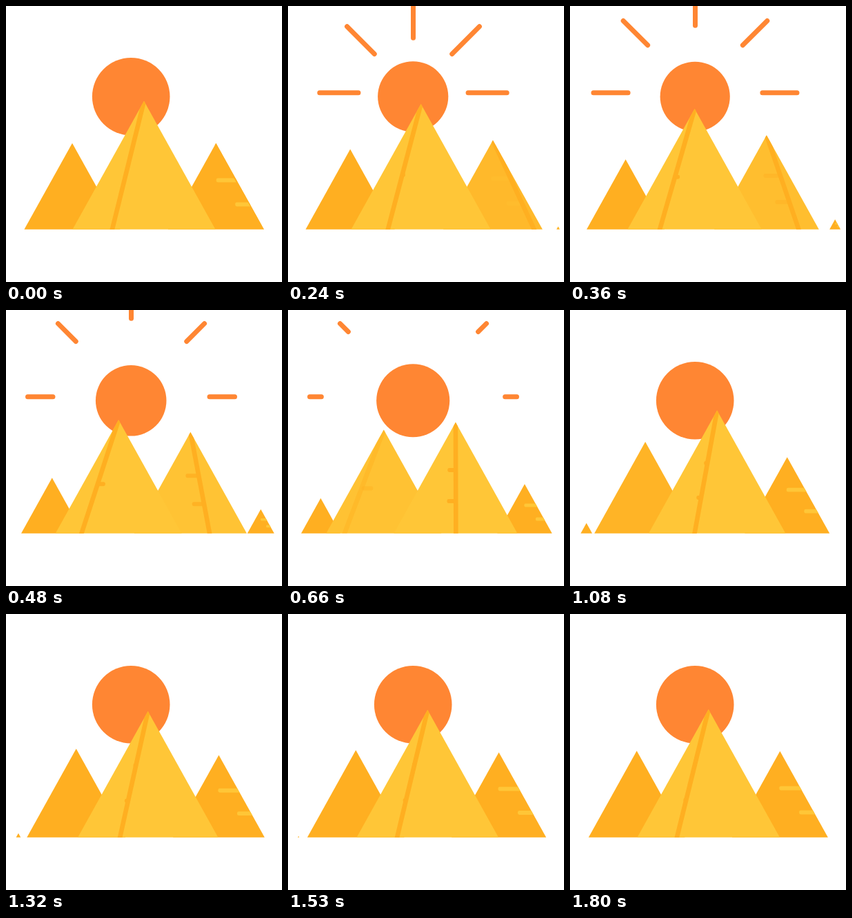
Write an HTML page with a canvas that moves like this. It is 400 by 400 pixels and loops after 1830 ms.

```html
<!DOCTYPE html>
<html lang="en">
<head>
<meta charset="utf-8">
<title>Pyramids</title>
<style>
  html, body { margin: 0; width: 100%; height: 100%; overflow: hidden; background: #fff; }
  canvas { display: block; width: 400px; height: 400px; }
</style>
</head>
<body>
<canvas id="stage" width="400" height="400"></canvas>
<script>
const LOOP = 1830, STEP = 30;
const GROUND = 323.7, SLOPE = 0.5565;
const ORANGE = [255, 175, 33], YELLOW = [255, 198, 55], SUN = '#ff8633';
const ctx = document.getElementById('stage').getContext('2d');

const clamp = v => Math.min(1, Math.max(0, v));
const lerp = (a, b, k) => a + (b - a) * k;
const span = (t, from, to) => clamp((t - from) / (to - from));
const smooth = k => k * k * (3 - 2 * k);
const rgb = c => `rgb(${c.map(Math.round)})`;
const mix = (a, b, k) => rgb(a.map((v, i) => lerp(v, b[i], k)));

// cubic-bezier(x1, 0, x2, 1), solved by bisection
function ease(u, x1, x2) {
  let lo = 0, hi = 1;
  for (let i = 0; i < 24; i++) {
    const s = (lo + hi) / 2, r = 1 - s;
    if (3 * r * r * s * x1 + 3 * r * s * s * x2 + s * s * s < u) lo = s;
    else hi = s;
  }
  return smooth((lo + hi) / 2);
}

function line(x1, y1, x2, y2, width, color, cap) {
  ctx.beginPath();
  ctx.moveTo(x1, y1);
  ctx.lineTo(x2, y2);
  ctx.lineWidth = width;
  ctx.strokeStyle = color;
  ctx.lineCap = cap;
  ctx.stroke();
}

// Details are drawn clipped to the pyramid's face
function pyramid(x, h, fill, details) {
  if (h < 0.8) return;
  const half = h * SLOPE, top = GROUND - h;
  ctx.save();
  ctx.beginPath();
  ctx.moveTo(x, top);
  ctx.lineTo(x + half, GROUND);
  ctx.lineTo(x - half, GROUND);
  ctx.closePath();
  ctx.fillStyle = fill;
  ctx.fill();
  ctx.clip();
  if (details) details(half, top);
  ctx.restore();
}

function tick(x1, x2, y, width, color) {
  const r = width / 2;
  ctx.beginPath();
  ctx.roundRect(Math.min(x1, x2), y - r, Math.abs(x2 - x1), width, r * 0.8);
  ctx.fillStyle = color;
  ctx.fill();
}

function stripe(x, top, foot) {
  line(x, top, x + foot * 1.05, lerp(top, GROUND, 1.05), 6.6, rgb(ORANGE), 'butt');
}

function drawSun(t) {
  const cx = 181.5, cy = 125.7;
  const inner = lerp(56, 150, Math.sin(span(t, 90, 1020) * Math.PI / 2));
  const outer = lerp(56, 150, ease(span(t, 0, 470), 0.3, 0.1));
  if (outer - inner > 0.8) {
    for (let i = 0; i < 5; i++) {
      const a = Math.PI * (1 + i / 4), dx = Math.cos(a), dy = Math.sin(a);
      line(cx + dx * inner, cy + dy * inner, cx + dx * outer, cy + dy * outer, 7, SUN, 'round');
    }
  }
  const shrink = t < 300 ? smooth(t / 300) : 1 - smooth(span(t, 300, 1080));
  ctx.beginPath();
  ctx.arc(181.2, 131.3, 56.3 - 5.8 * shrink, 0, Math.PI * 2);
  ctx.fillStyle = SUN;
  ctx.fill();
}

function drawLeaving(p) {
  pyramid(lerp(96, 14, p), 125 * (1 - p), rgb(ORANGE));
}

function drawArriving(t) {
  const k = ease(span(t, 0.03 * LOOP, LOOP), 0.38, 0.12);
  const x = lerp(394.5, 304.3, k), h = 125 * k;
  pyramid(x, h, rgb(ORANGE), (half, top) => {
    const w = 6 * k ** 0.4;
    tick(x - half * 0.015, x + half, top + h * 0.43, w, rgb(YELLOW));
    tick(x + half * 0.4, x + half * 1.2, top + h * 0.71, w, rgb(YELLOW));
  });
}

// Centre to left
function drawReceding(t, p) {
  const x = lerp(200, 96, p), h = lerp(186, 125, p);
  pyramid(x, h, mix(YELLOW, ORANGE, span(t, 550, 1220)), (half, top) => {
    ctx.globalAlpha = 1 - span(t, 520, 780);
    const foot = half * (-0.445 - 0.4 * p);
    stripe(x, top, foot);
    const mid = x + foot * 0.565;
    tick(mid, mid + 2.5 + 24 * p, top + h * 0.565, 6, rgb(ORANGE));
  });
}

// Right to centre
function drawAdvancing(t, p) {
  const x = lerp(304.3, 200, p), h = lerp(125, 186, p), q = 1 - p;
  const turn = span(t, 0, 550);
  pyramid(x, h, mix(ORANGE, YELLOW, turn), (half, top) => {
    const foot = half * (0.95 - 1.9 * p + 0.5 * p * p + 0.1 * q ** 30);
    const color = mix(YELLOW, ORANGE, turn);
    const marks = [[0.43, 3 + 28 * q ** 1.3], [0.71, 3.5 + 20.5 * q ** 0.9]];
    for (const [level, length] of marks) {
      const mid = x + foot * level;
      tick(mid - length, mid, top + h * level, 6, color);
    }
    stripe(x, top, foot);
  });
}

function draw(t) {
  ctx.fillStyle = '#fff';
  ctx.fillRect(0, 0, 400, 400);
  const p = ease(t / LOOP, 0.335, 0.18), q = p * 0.993;
  drawSun(t);
  drawLeaving(p);
  drawArriving(t);
  if (q < 0.5) {
    drawAdvancing(t, q);
    drawReceding(t, q);
  } else {
    drawReceding(t, q);
    drawAdvancing(t, q);
  }
}

const start = performance.now();
function frame() {
  const t = (performance.now() - start) % LOOP;
  draw(Math.floor(t / STEP) * STEP);
  requestAnimationFrame(frame);
}
frame();
</script>
</body>
</html>
```
